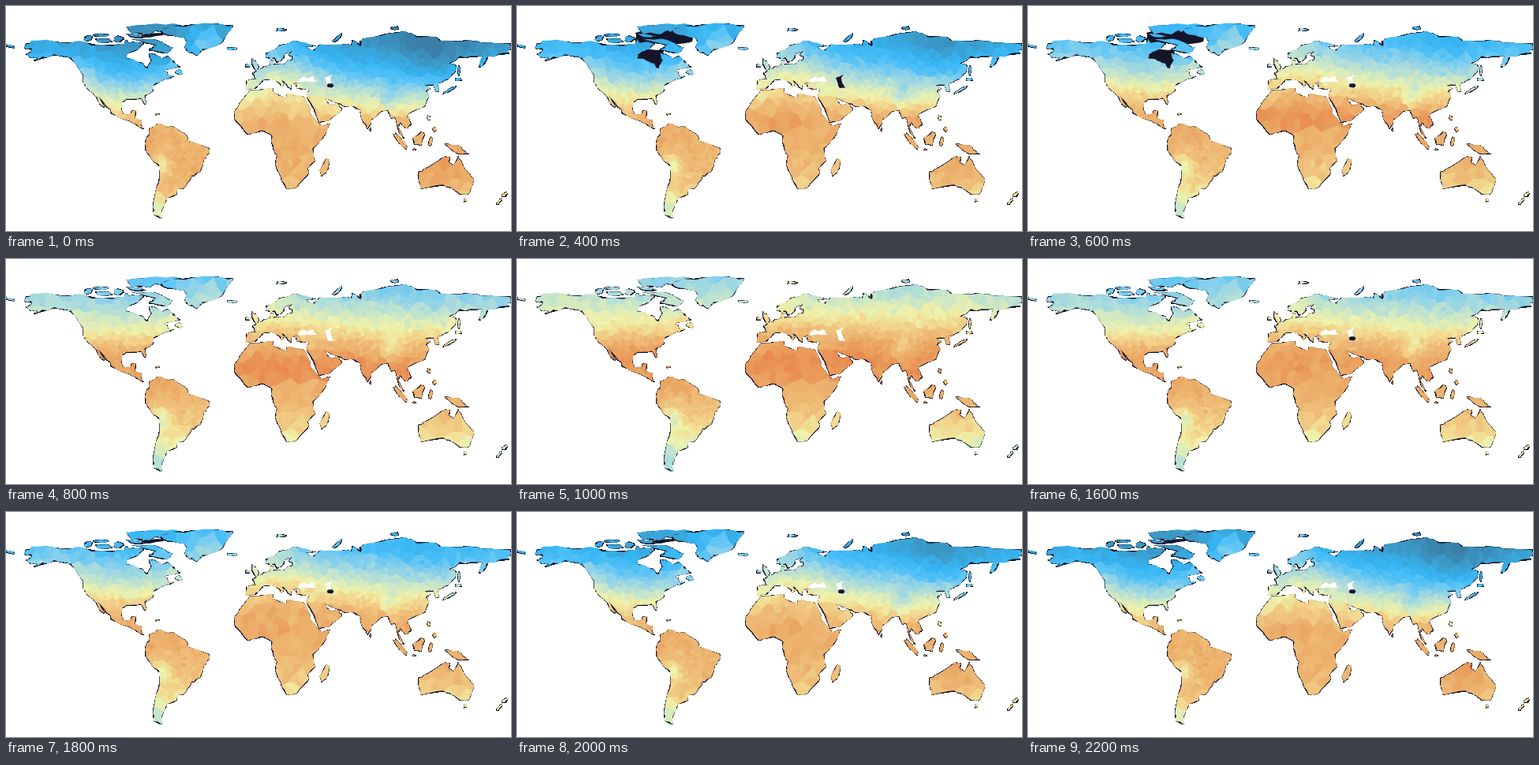
Recreate the animation shown at these times as a matplotlib script. Size 640x285 px, loop 2.4 s.

```python
import numpy as np
import matplotlib.pyplot as plt
from matplotlib.animation import FuncAnimation
from matplotlib.colors import LinearSegmentedColormap
from matplotlib.patches import PathPatch, Polygon
from matplotlib.path import Path

W, H, MONTHS = 640, 285, 12
DARK = "#14152b"
rng = np.random.default_rng(7)


def wind(p):
    x, y = p.T
    return p if np.sum(x * np.roll(y, -1) - y * np.roll(x, -1)) > 0 else p[::-1]


def shape(*xy, levels=2):
    """Key points of a coast, roughened by midpoint displacement."""
    p = wind(np.reshape(np.array(xy, float), (-1, 2)))
    for _ in range(levels):
        edge = np.roll(p, -1, axis=0) - p
        size = np.hypot(*edge.T)[:, None]
        normal = edge[:, ::-1] * (1, -1) / size
        push = np.minimum(0.07 * size, 0.6) * rng.normal(size=size.shape)
        mid = p + edge / 2 + normal * push
        p = np.stack([p, mid], axis=1).reshape(-1, 2)
    return p


def isle(x, y, rx, ry, tilt=0):
    """Small ragged ellipse, tilted in degrees."""
    a = np.linspace(0, 2 * np.pi, 12, endpoint=False)
    r = rng.uniform(0.75, 1.2, 12)
    c, s = np.cos(np.radians(tilt)), np.sin(np.radians(tilt))
    u, v = rx * r * np.cos(a), ry * r * np.sin(a)
    return wind(np.column_stack([x + c * u - s * v, y + s * u + c * v]))


# Coasts, plate carree at 16/9 pixels per degree
canada = shape(
    25, 48, 42, 44, 80, 47, 92, 45, 124, 50, 149, 49, 152, 43, 156, 47,
    175, 48, 165, 56, 153, 61, 152, 66, 164, 70, 174, 73, 178, 79, 184, 69,
    181, 60, 188, 60, 196, 66, 205, 63, 211, 69, 221, 77, 202, 81, 194, 88,
    98, 88, 89, 74, 82, 67, 72, 64, 60, 62, 35, 70, 40, 66, 32, 66, 25, 61,
    34, 56, 24, 54)
usa = shape(
    97, 83, 195, 84, 204, 83, 205, 88, 213, 89, 204, 93, 203, 91, 195, 96,
    186, 102, 186, 108, 176, 114, 178, 125, 175, 124, 171, 117, 153, 118,
    147, 122, 146, 131, 149, 137, 157, 138, 159, 133, 165, 132, 163, 142,
    172, 144, 171, 151, 175, 156, 169, 153, 157, 146, 140, 139, 132, 135,
    132, 131, 116, 114, 125, 129, 121, 126, 112, 113, 102, 103, 99, 99)
greenland = shape(
    242, 63, 232, 59, 226, 53, 229, 46, 226, 40, 199, 35, 190, 31, 213, 25,
    261, 22, 288, 25, 274, 46, 249, 56)
south_america = shape(
    182, 155, 193, 149, 210, 152, 228, 163, 231, 171, 257, 180, 258, 186,
    251, 194, 246, 210, 235, 216, 225, 231, 217, 232, 216, 239, 204, 243,
    200, 252, 197, 261, 198, 269, 187, 264, 186, 254, 193, 224, 195, 203,
    185, 195, 176, 181, 176, 172, 182, 163)
africa = shape(
    309, 107, 338, 104, 338, 110, 355, 117, 356, 112, 377, 115, 386, 137,
    399, 152, 411, 149, 405, 162, 389, 181, 392, 196, 382, 206, 383, 213,
    368, 230, 356, 232, 345, 210, 341, 201, 344, 190, 336, 172, 337, 164,
    327, 159, 307, 163, 290, 144, 290, 133, 304, 113)
europe = shape(
    304, 105, 304, 94, 317, 93, 312, 85, 328, 76, 335, 75, 335, 69, 339, 68,
    339, 74, 353, 74, 358, 68, 363, 69, 362, 63, 436, 61, 436, 112, 384, 110,
    384, 105, 369, 105, 367, 100, 372, 98, 362, 99, 361, 106, 354, 98,
    344, 91, 353, 99, 348, 103, 348, 99, 338, 93, 326, 94, 320, 100, 316, 105)
scandinavia = shape(
    372, 64, 361, 64, 358, 61, 364, 55, 351, 61, 353, 64, 349, 69, 343, 72,
    340, 66, 330, 66, 329, 60, 339, 56, 346, 50, 366, 44, 393, 51, 380, 52,
    388, 57, 398, 49, 416, 49, 435, 49, 435, 68, 372, 67)
siberia = shape(
    429, 48, 438, 50, 439, 43, 449, 50, 452, 42, 475, 37, 505, 32, 521, 39,
    546, 40, 551, 44, 587, 43, 604, 47, 640, 48, 640, 55, 635, 56, 638, 60,
    611, 64, 608, 71, 599, 78, 604, 63, 574, 65, 561, 73, 571, 76, 569, 84,
    560, 93, 551, 97, 429, 97)
asia = shape(
    429, 91, 553, 93, 547, 100, 549, 108, 545, 109, 542, 100, 530, 101,
    538, 105, 532, 108, 536, 115, 531, 127, 508, 137, 514, 150, 507, 155,
    499, 147, 497, 153, 505, 168, 498, 160, 493, 141, 488, 142, 484, 133,
    475, 133, 463, 144, 458, 156, 449, 137, 449, 132, 439, 127, 426, 126)
arabia = shape(
    436, 127, 420, 123, 405, 117, 412, 126, 420, 124, 426, 131, 412, 143,
    397, 148, 381, 115, 384, 105, 436, 105)
australia = shape(
    523, 210, 537, 203, 556, 191, 563, 192, 561, 197, 568, 202, 573, 190,
    580, 204, 593, 220, 587, 237, 575, 239, 565, 231, 553, 227, 525, 232)
baffin = shape(160, 42, 190, 43, 211, 53, 204, 60, 181, 56, 190, 50)
ellesmere = shape(152, 26, 180, 24, 222, 25, 190, 31, 181, 36, 160, 35)
borneo = shape(515, 168, 527, 159, 531, 162, 526, 177, 518, 176)
guinea = shape(556, 175, 572, 176, 587, 188, 569, 185)

# Islands: centre, half axes, tilt
ISLES = [isle(*i) for i in [
    (123, 44, 11, 3, 5), (104, 41, 6, 3, -10), (121, 37, 9, 2), (142, 42, 6, 4),
    (164, 38, 11, 2, 8), (219, 84, 4, 3), (192, 137, 3, 1), (287, 54, 6, 2),
    (349, 30, 6, 2), (316, 75, 3, 8, -30), (306, 76, 3, 2), (420, 41, 8, 2, -40),
    (493, 28, 5, 2), (4, 51, 7, 1.5, 14), (574, 82, 1.5, 6), (573, 93, 4, 2),
    (563, 106, 9, 1.5, -30), (536, 142, 2, 3), (543, 156, 2, 3), (462, 157, 1, 2),
    (500, 171, 13, 2.5, 50), (517, 182, 2, 1), (538, 172, 2, 6, 15),
    (404, 204, 4, 11, 20), (582, 246, 2, 2), (632, 239, 4, 2, -35),
    (625, 248, 6, 1.5, -45)]]

LAND = [canada, usa, greenland, south_america, africa, europe, scandinavia,
        siberia, asia, arabia, australia, baffin, ellesmere, borneo,
        guinea] + ISLES

black_sea = shape(370, 97, 371, 93, 378, 89, 381, 92, 389, 89, 394, 96, 384, 96)
caspian = shape(404, 91, 414, 87, 411, 91, 416, 104, 409, 104)
hudson = shape(150, 53, 186, 55, 184, 70, 179, 80, 150, 70)
baffin_bay = shape(150, 34, 178, 28, 222, 37, 222, 45, 206, 48, 150, 48)

# Temperature scale, deg C
STOPS = [(-42, "#3a7fa8"), (-28, "#3c9dcc"), (-18, "#36b5f3"), (-10, "#52c2f8"),
         (-3, "#8ed2ea"), (3, "#b3dfd8"), (8, "#d2e9c2"), (13, "#eff3ac"),
         (18, "#f3d88f"), (23, "#efbe79"), (28, "#eba966"), (35, "#e98a50")]
LO, HI = STOPS[0][0], STOPS[-1][0]
cmap = LinearSegmentedColormap.from_list(
    "heat", [((t - LO) / (HI - LO), c) for t, c in STOPS], N=512)

# Latitude, yearly mean, half the July-January range
ZONES = [(-55, 4, -4), (-45, 8, -6), (-35, 17, -6), (-20, 22, -3.5),
         (0, 26, 0), (12, 27, 2), (25, 24, 9), (35, 17.5, 11), (50, 4, 13),
         (60, -4, 15), (70, -12, 17), (83, -15, 14)]
# Regions: x, y, radius, change of mean, change of half range
REGIONS = [
    (545, 55, 40, -6, 11),     # Siberia
    (345, 70, 40, 9, -5),      # Europe
    (252, 47, 14, 10, -11),    # Greenland
    (160, 72, 35, -3, 3),      # Hudson Bay
    (60, 62, 28, 3, -1),       # Alaska
    (98, 90, 14, 2, -5),       # Pacific coast
    (440, 85, 30, 0, 3),       # Kazakhstan
    (487, 113, 11, -8, 0),     # Tibet
    (196, 202, 8, -13, 0),     # Andes
    (393, 153, 7, -7, -3),     # Ethiopia
    (553, 205, 22, 3, -2)]     # Australia


def bell(d2, r):
    return np.exp(-d2 / (2 * r * r))


def dist2(pts, x, y):
    return (pts[:, 0] - x) ** 2 + (pts[:, 1] - y) ** 2


def place_stations(n=9000):
    pts = rng.uniform((0, 20), (W, 272), (n, 2))
    on_land = np.any([Path(p).contains_points(pts) for p in LAND], axis=0)
    density = np.full(n, 0.18)
    for x, y, r in [(140, 104, 28), (335, 82, 26), (520, 108, 24),
                    (440, 85, 30), (225, 190, 24)]:
        density += 0.7 * bell(dist2(pts, x, y), r)
    return pts[on_land & (rng.random(n) < density)]


def nearest(pts, scale=2):
    """Index of the closest station for each sample of the stage."""
    px, py = pts.T.astype(np.float32)
    x = (np.arange(W * scale, dtype=np.float32) + 0.5) / scale
    dx2 = (x[:, None] - px) ** 2
    rows = (np.arange(H * scale, dtype=np.float32) + 0.5) / scale
    return np.array([np.argmin(dx2 + (y - py) ** 2, axis=1) for y in rows])


def monthly_temps(pts):
    x, y = pts.T
    lat = (170.6 - y) * 9 / 16
    zone, zone_mean, zone_swing = np.transpose(ZONES)
    mean = np.interp(lat, zone, zone_mean)
    swing = np.interp(lat, zone, zone_swing)
    for rx, ry, r, dm, ds in REGIONS:
        near = bell(dist2(pts, rx, ry), r)
        mean += dm * near
        swing += ds * near
    # Dry-season heat before the monsoon
    dry = 6 * bell((y - 141) ** 2, 9) * ((x > 285) & (x < 510))
    local = rng.normal(0, 1.2, len(pts))
    out = []
    for m in range(MONTHS):
        t = mean + swing * np.cos(2 * np.pi * (m - 6) / MONTHS)
        t += dry * bell((m - 3.4) ** 2, 1.1)
        out.append(t + local + rng.normal(0, 0.7, len(pts)))
    return np.array(out)


stations = place_stations()
cell = nearest(stations)
colors = cmap((monthly_temps(stations) - LO) / (HI - LO), bytes=True)[..., :3]

fig = plt.figure(figsize=(W / 100, H / 100), dpi=100, facecolor="white")
ax = fig.add_axes([0, 0, 1, 1])
ax.axis("off")


def blob(pts, color, z):
    return ax.add_patch(Polygon(pts, fc=color, ec="none", zorder=z))


def outline(polys):
    return Path.make_compound_path(
        *[Path(np.vstack([p, p[:1]]), closed=True) for p in polys])


def ragged(p):
    """Shaken copy of a coast, looser in the far north."""
    loose = np.where(p[:, 1:] < 80, 0.75, 0.5)
    return p + (0.1, -0.25) + loose * rng.normal(size=p.shape)


# Dark land shows wherever the ragged cells miss it
ax.add_patch(PathPatch(outline(LAND), fc=DARK, ec="none", zorder=2,
                       antialiased=False))
cells = ax.imshow(colors[0][cell], extent=(0, W, H, 0), aspect="auto", zorder=3)
cells.set_clip_path(outline([ragged(p) for p in LAND]), transform=ax.transData)

blob(black_sea, "white", 5)
blob(caspian, "white", 5)
blob(isle(449, 47, 1.5, 4), DARK, 4)

# Gaps in the coverage, with the months they show
GAPS = [(blob(hudson, DARK, 1), {1, 2, 3}),
        (blob(baffin_bay, DARK, 1), {1, 2, 3}),
        (blob(isle(182, 37, 17, 2.5, -5), DARK, 1), {0, 9, 10, 11}),
        (blob(caspian, DARK, 6), {1, 2}),
        (blob(isle(411, 101, 4, 3), DARK, 6), {0, 3, 6, 7, 8, 9, 10, 11})]

ax.set_xlim(0, W)
ax.set_ylim(H, 0)


def show_month(m):
    cells.set_data(colors[m][cell])
    for patch, months in GAPS:
        patch.set_visible(m in months)
    return [cells]


anim = FuncAnimation(fig, show_month, frames=MONTHS, interval=200,
                     repeat=True, repeat_delay=0, blit=False)
plt.show()
```
